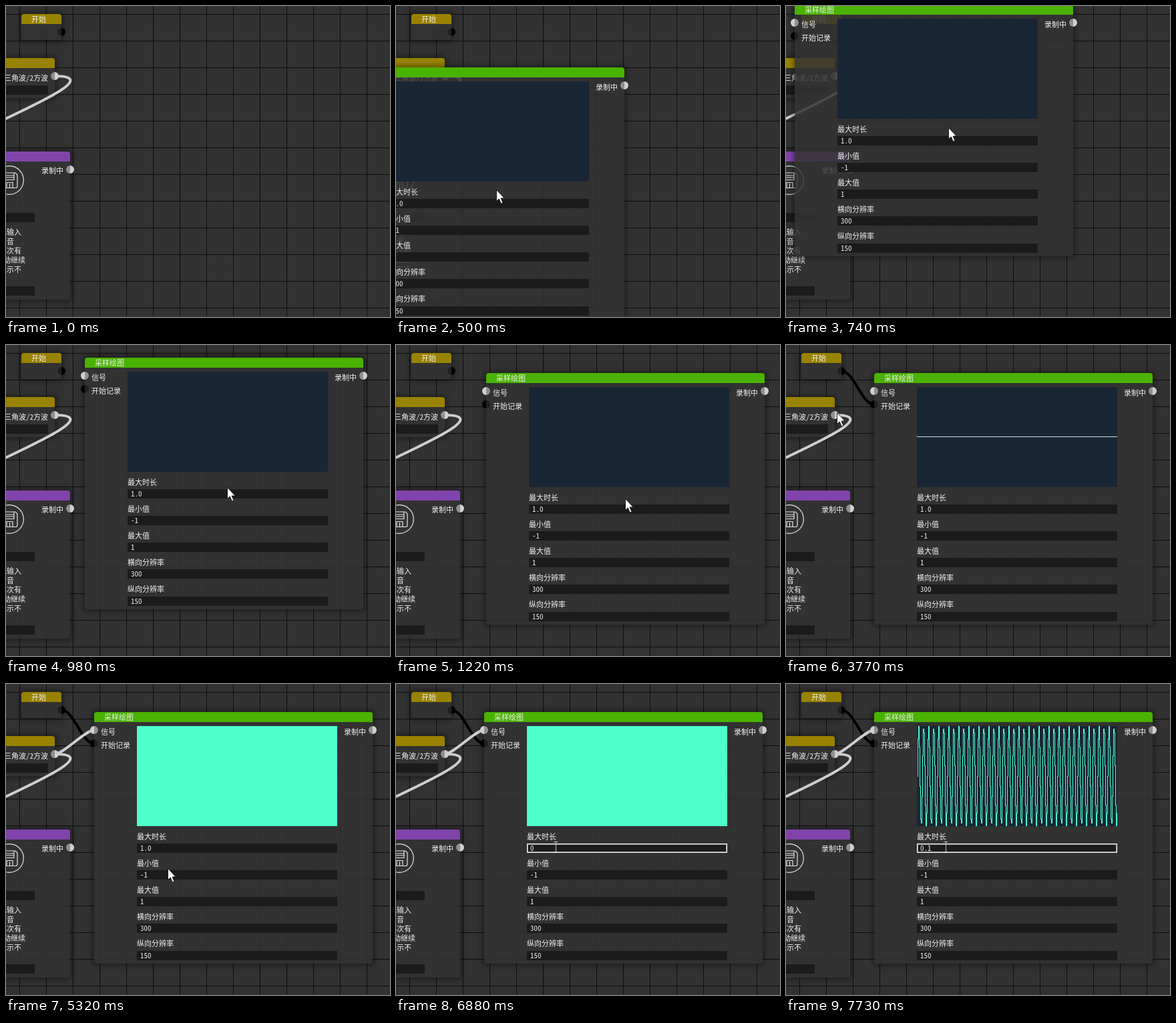
Write an HTML page that moves like this. It is 575 px wide and 466 px high and loops after 8 s.

```html
<!DOCTYPE html>
<html lang="zh-CN">
<head>
<meta charset="utf-8">
<title>采样绘图</title>
<style>
@property --x { syntax: "<number>"; inherits: false; initial-value: 0; }
@property --y { syntax: "<number>"; inherits: false; initial-value: 0; }
@property --w { syntax: "<number>"; inherits: false; initial-value: 300; }
html, body { margin: 0; width: 100%; height: 100%; overflow: hidden; background: #323232; }
#stage {
  position: relative; width: 575px; height: 466px; overflow: hidden;
  background:
    linear-gradient(#0e0e0e 1px, transparent 1px) 0 12px / 40px 40px,
    linear-gradient(90deg, #0e0e0e 1px, transparent 1px) 20px 0 / 40px 40px,
    #323232;
  font: 11px/14px "Noto Sans Mono CJK SC", "Noto Sans CJK SC", monospace;
  color: #f2f2f2; white-space: pre;
}
#stage div, #stage b, #stage svg { position: absolute; left: calc(var(--x) * 1px); top: calc(var(--y) * 1px); }
b { font-weight: 400; }
.node {
  width: calc(var(--w) * 1px); height: calc(var(--h) * 1px); border-radius: 4px;
  background: rgba(51, 51, 51, .85); box-shadow: 0 0 6px 4px rgba(0, 0, 0, .3);
}
.head { width: 100%; height: 15px; border-radius: 4px 4px 0 0; background: var(--c); }
.pin {
  width: 12px; height: 12px; margin: -6px; border-radius: 50%;
  background: linear-gradient(90deg, var(--l) 50%, var(--r) 50%);
}
.out { --l: #8f8f8f; --r: #d0d0d0; }
.in { --l: #d0d0d0; --r: #8f8f8f; }
.field { width: calc(var(--w) * 1px); height: 14px; background: #1b1b1b; line-height: 13px; }
.field b { --x: 5; }
svg { overflow: hidden; }
.wire { fill: none; stroke: #cfcfcf; stroke-width: 4; }

/* every change is a hard step */
.a { animation: 8s step-end infinite; }
#panel { animation-name: panel; }
#arrow { animation-name: arrow; }
#beam { animation-name: beam; }
#run { animation-name: run; stroke: #000; }
#sig { animation-name: sig; }
#flat { animation-name: flat; }
#solid { animation-name: solid; }
#wave { animation-name: wave; }
#focus { animation-name: focus; }
#old { animation-name: old; }
#k0 { animation-name: k0; }
#k1 { animation-name: k1; }
#k2 { animation-name: k2; }

@keyframes panel {
  0% { opacity: 0; transform: translate(-75px, 92px); }
  6.25% { opacity: 1; transform: translate(-75px, 92px); }
  7.75% { opacity: 1; transform: translate(-38px, 32px); }
  9.25% { opacity: 1; transform: translate(13px, -2px); }
  10.75% { opacity: 1; transform: translate(70px, 4px); }
  12.25% { opacity: 1; transform: translate(118px, 19px); }
  13.75% { opacity: 1; transform: translate(130px, 36px); }
  15.25% { opacity: 1; transform: translate(135px, 42px); }
  16.875% { opacity: 1; transform: translate(133px, 42px); }
  18.375%, 100% { opacity: 1; transform: translate(132px, 42px); }
}
@keyframes arrow {
  0% { transform: translate(-40px, 290px); }
  6.25% { transform: translate(150px, 275px); }
  7.75% { transform: translate(196px, 214px); }
  9.25% { transform: translate(243px, 182px); }
  10.75% { transform: translate(290px, 196px); }
  12.25% { transform: translate(331px, 213px); }
  13.75% { transform: translate(340px, 226px); }
  15.25% { transform: translate(343px, 230px); }
  16.875% { transform: translate(341px, 230px); }
  18.375% { transform: translate(340px, 230px); }
  21.375% { transform: translate(318px, 212px); }
  22.875% { transform: translate(250px, 150px); }
  24.375% { transform: translate(170px, 85px); }
  25.875% { transform: translate(110px, 42px); }
  27.375% { transform: translate(94px, 34px); }
  30.5% { transform: translate(92px, 34px); }
  33.5% { transform: translate(84px, 36px); }
  35% { transform: translate(92px, 47px); }
  36.5% { transform: translate(116px, 74px); }
  38% { transform: translate(133px, 92px); }
  42.625% { transform: translate(130px, 93px); }
  44.125% { transform: translate(114px, 96px); }
  45.625% { transform: translate(88px, 100px); }
  47.125% { transform: translate(76px, 101px); }
  48.625% { transform: translate(74px, 102px); }
  50.125% { transform: translate(78px, 102px); }
  51.625% { transform: translate(96px, 88px); }
  53.125% { transform: translate(121px, 72px); }
  54.625% { transform: translate(131px, 68px); }
  56.125% { transform: translate(134px, 72px); }
  57.625% { transform: translate(150px, 95px); }
  59.125% { transform: translate(180px, 140px); }
  60.625% { transform: translate(210px, 180px); }
  62% { transform: translate(223px, 200px); }
  63.5% { transform: translate(232px, 235px); }
  65% { transform: translate(239px, 262px); }
  66.5% { transform: translate(242px, 276px); }
  68% { transform: translate(241px, 266px); }
  69.5% { transform: translate(240px, 240px); }
  72.5%, 100% { transform: translate(-40px, 240px); }
}
@keyframes run {
  0% { opacity: 0; d: path("M83 39C83 39 84 40 84 40"); }
  35% { opacity: 1; d: path("M83 39C87 39 88 47 92 47"); }
  36.5% { opacity: 1; d: path("M83 39C97 39 102 74 116 74"); }
  38%, 100% { opacity: 1; d: path("M83 39C102 39 113 89 132 89"); }
}
@keyframes sig {
  0% { opacity: 0; d: path("M73 105C74 105 77 102 78 102"); }
  50.125% { opacity: 1; d: path("M73 105C74 105 77 102 78 102"); }
  51.625% { opacity: 1; d: path("M73 105C78 105 91 88 96 88"); }
  53.125% { opacity: 1; d: path("M73 105C83 105 111 72 121 72"); }
  54.625%, 100% { opacity: 1; d: path("M73 105C86 105 119 69 132 69"); }
}
@keyframes flat { 0% { opacity: 0; } 42.625% { opacity: 1; } 56.125%, 100% { opacity: 0; } }
@keyframes solid { 0% { opacity: 0; } 56.125% { opacity: 1; } 95.125%, 100% { opacity: 0; } }
@keyframes wave { 0% { opacity: 0; } 95.125%, 100% { opacity: 1; } }
@keyframes beam { 0% { opacity: 0; } 72.5%, 100% { opacity: 1; } }
@keyframes focus {
  0% { box-shadow: none; }
  74%, 100% { box-shadow: inset 0 0 0 1px #f4f4f4, inset 0 0 0 2px #999; }
}
@keyframes old {
  0% { opacity: 1; background: transparent; }
  75.5% { opacity: 1; background: #2f6fc4; }
  86%, 100% { opacity: 0; background: transparent; }
}
@keyframes k0 { 0% { opacity: 0; } 86%, 100% { opacity: 1; } }
@keyframes k1 { 0% { opacity: 0; } 87.5%, 100% { opacity: 1; } }
@keyframes k2 { 0% { opacity: 0; } 89%, 100% { opacity: 1; } }
</style>
</head>
<body>
<div id="stage">
  <div class="node" style="--x:23;--y:12;--w:60;--h:39">
    <div class="head" style="--c:#998200"></div>
    <b style="--x:15">开始</b>
    <div class="pin" style="--x:60;--y:27;--l:#202020;--r:#000"></div>
  </div>

  <div class="node" style="--x:-40;--y:78;--w:113;--h:60">
    <div class="head" style="--c:#998200"></div>
    <b style="left:auto;right:10px;--y:22">三角波/2方波</b>
    <div class="field" style="--x:10;--y:41;--w:93"></div>
    <div class="pin out" style="--x:113;--y:27"></div>
  </div>

  <div class="node" style="--x:-100;--y:218;--w:196;--h:222">
    <div class="head" style="--c:#8043ab"></div>
    <b style="--x:153;--y:21">录制中</b>
    <div class="pin out" style="--x:196;--y:27"></div>
    <svg style="--x:82;--y:20" width="46" height="46" fill="none" stroke="#e4e4e4" stroke-width="1.2">
      <circle cx="23" cy="23" r="21.3"/>
      <path d="M13 12H32L35 15V32Q35 34.500 32.500 34.500H13.500Q11 34.500 11 32V14Q11 12 13 12M15 12V22.500H30V12M18 16H30M18 19H30M19 34V26.500H28V34M23.500 28V34"/>
    </svg>
    <div class="field" style="--x:10;--y:92;--w:133"></div>
    <b style="left:auto;right:73px;--y:113">无输入</b>
    <b style="left:auto;right:84px;--y:127">声音</b>
    <b style="left:auto;right:73px;--y:141">再次有</b>
    <b style="left:auto;right:67px;--y:155">自动继续</b>
    <b style="left:auto;right:73px;--y:169">表示不</b>
    <div class="field" style="--x:10;--y:202;--w:133"></div>
  </div>

  <svg width="575" height="466">
    <path class="wire" d="M73 105C198 105 -225 245 -100 245"/>
    <path id="run" class="wire a" d="M83 39"/>
    <path id="sig" class="wire a" d="M73 105"/>
  </svg>

  <div id="panel" class="node a" style="--w:417;--h:377">
    <div class="head" style="--c:#4ab200"></div>
    <b style="--x:15">采样绘图</b>
    <b style="--x:10;--y:22">信号</b>
    <b style="--x:10;--y:42">开始记录</b>
    <b style="--x:374;--y:22">录制中</b>
    <div class="pin in" style="--y:27"></div>
    <div class="pin" style="--y:47;--l:#000;--r:#202020"></div>
    <div class="pin out" style="--x:417;--y:27"></div>
    <svg style="--x:64;--y:21;background:#192635" width="300" height="150">
      <path id="flat" class="a" d="M0 74.500H300" stroke="#cfdde2"/>
      <rect id="solid" class="a" width="300" height="150" fill="#4dffcb"/>
      <path id="wave" class="a" fill="none" stroke="#4dffcb" shape-rendering="crispEdges"/>
    </svg>
    <b style="--x:64;--y:179">最大时长</b>
    <div id="focus" class="field a" style="--x:64;--y:197">
      <b id="old" class="a">1.0</b>
      <b><span id="k0" class="a">0</span><span id="k1" class="a">.</span><span id="k2" class="a">1</span></b>
    </div>
    <b style="--x:64;--y:219">最小值</b>
    <div class="field" style="--x:64;--y:237"><b>-1</b></div>
    <b style="--x:64;--y:259">最大值</b>
    <div class="field" style="--x:64;--y:277"><b>1</b></div>
    <b style="--x:64;--y:299">横向分辨率</b>
    <div class="field" style="--x:64;--y:317"><b>300</b></div>
    <b style="--x:64;--y:339">纵向分辨率</b>
    <div class="field" style="--x:64;--y:358"><b>150</b></div>
  </div>

  <svg width="575" height="466">
    <path id="arrow" class="a" d="M.5 .5V17.500L4.300 14L7.300 21L10 19.900L7.100 13H12.300Z" fill="#fff" stroke="#111" stroke-width=".9"/>
    <path id="beam" class="a" d="M236 236.500H242M239.500 237V251M236 251.500H242" fill="none" stroke="#c4c4c4"/>
  </svg>
</div>
<script>
// sine trace: one sample per pixel, each joined to the last by a vertical stroke
const period = 7.5;
let d = "M.5 75";
for (let x = 0; x < 300; x++) {
  const y = 75 - 74.5 * Math.sin(2 * Math.PI * x / period);
  d += `H${x + 0.5}V${y.toFixed(1)}`;
}
document.getElementById("wave").setAttribute("d", d);
</script>
</body>
</html>
```
